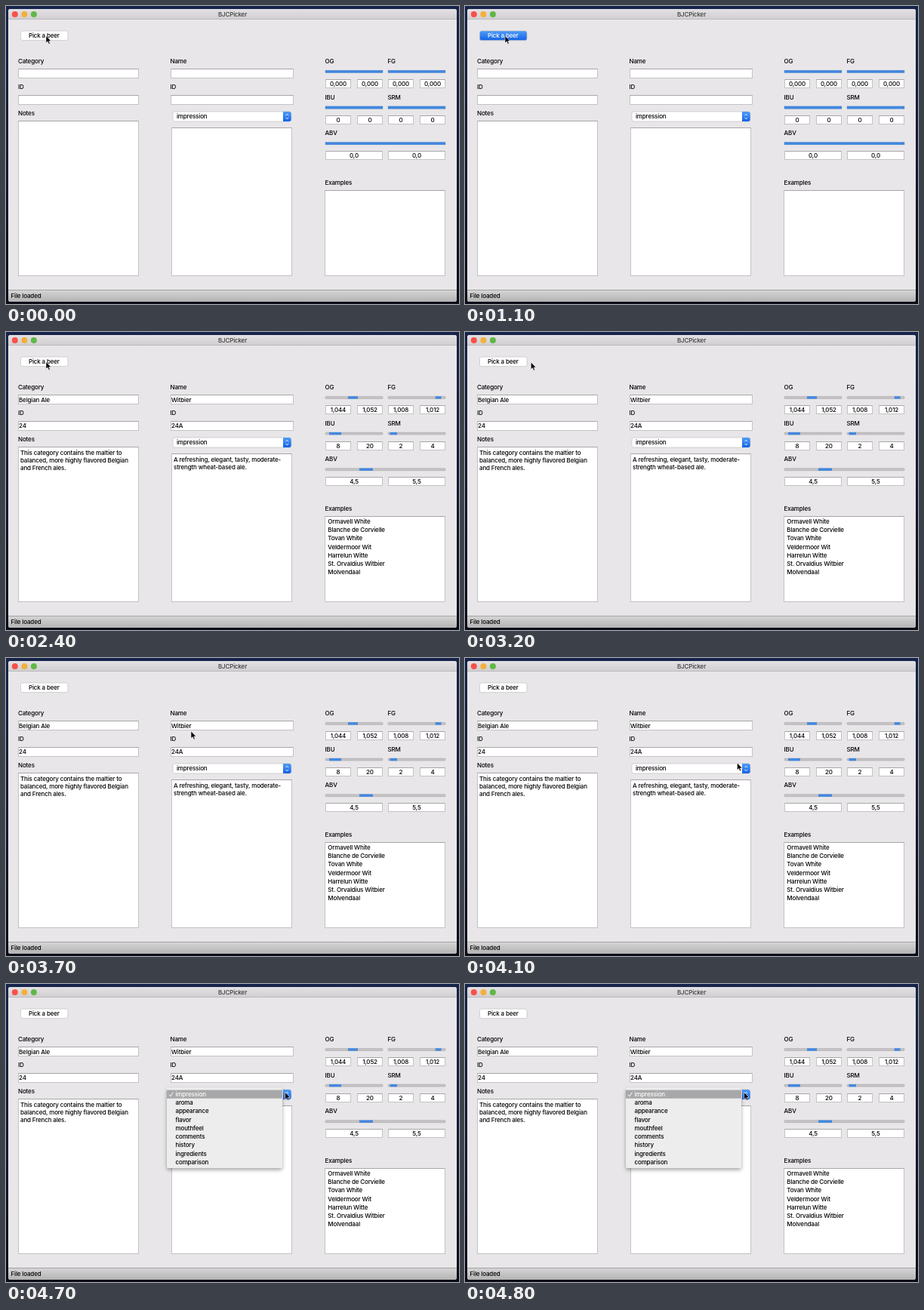
These frames come from a looping animation (600 by 395 pixels, 5 s). An HTML page:

```html
<!DOCTYPE html>
<html lang="en">
<head>
<meta charset="utf-8">
<title>BJCPicker</title>
<style>
html, body { margin: 0; width: 100%; height: 100%; overflow: hidden; background: #10182f; }
svg { display: block; width: 600px; height: 395px; }
text { font: 500 8px Inter, "Open Sans", sans-serif; letter-spacing: -.15px; fill: #000; white-space: pre; }
.mid { text-anchor: middle; }
.light { fill: #fff; }
.title { fill: #3c3c3c; }
</style>
</head>
<body>
<svg id="stage" viewBox="0 0 600 395">
  <defs>
    <linearGradient id="desk" x2="0" y2="1"><stop stop-color="#16244c"/><stop offset=".5" stop-color="#151b33"/><stop offset="1" stop-color="#0a0d18"/></linearGradient>
    <linearGradient id="bar" x2="0" y2="1"><stop stop-color="#e3e1e3"/><stop offset="1" stop-color="#d1cfd1"/></linearGradient>
    <linearGradient id="status" x2="0" y2="1"><stop stop-color="#d8d7d8"/><stop offset="1" stop-color="#b4b3b4"/></linearGradient>
    <linearGradient id="blue" x2="0" y2="1"><stop stop-color="#4f9cf8"/><stop offset="1" stop-color="#1462e6"/></linearGradient>
    <filter id="shadow" x="-10%" y="-10%" width="120%" height="125%"><feDropShadow dx="0" dy="2.5" stdDeviation="2.5" flood-opacity=".35"/></filter>
  </defs>
  <rect width="600" height="395" fill="url(#desk)"/>
  <rect x="3" y="4" width="594" height="388" rx="3" fill="#e8e6e8"/>
  <path d="M3 17V7Q3 4 6 4H594Q597 4 597 7V17Z" fill="url(#bar)"/>
  <path d="M3 17.5H597" stroke="#bdbbbd"/>
  <circle cx="11.8" cy="10.9" r="4" fill="#f9504a"/>
  <circle cx="24.4" cy="10.9" r="4" fill="#f3b03c"/>
  <circle cx="36.9" cy="10.9" r="4" fill="#5fb847"/>
  <path d="M3 376H597V389Q597 392 594 392H6Q3 392 3 389Z" fill="url(#status)"/>
  <path d="M3 376.5H597" stroke="#a5a4a5"/>
  <g id="form"></g>
  <g id="blank"></g>
  <g id="loaded"></g>
  <g id="menu"></g>
  <path id="cursor" d="M0 0V9.6L2.2 7.5 3.7 10.9 5.3 10.2 3.9 7H6.8Z" fill="#000" stroke="#fff" stroke-width=".6"/>
</svg>
<script>
const $ = id => document.getElementById(id);
const text = (x, y, s, cls = '') => `<text x="${x}" y="${y}" class="${cls}">${s}</text>`;
const rect = (x, y, w, h, fill, extra = '') =>
  `<rect x="${x}" y="${y}" width="${w}" height="${h}" fill="${fill}" ${extra}/>`;
const lines = (x, y, step, list) => list.map((s, i) => text(x, y + i * step, s)).join('');
const box = (x, y, w, h) =>
  rect(x, y, w, h, '#fff', 'stroke="#c4c2c4"') +
  `<path d="M${x} ${y}h${w}" stroke="#a9a7a9"/>`;
const button = (fill, cls) =>
  rect(19.5, 33, 62.5, 12.6, fill, 'rx="2.6" stroke="#bcbabc" stroke-width=".6"') +
  text(50.4, 42.2, 'Pick a beer', 'mid ' + cls);

// label, x, y, width, blank value, range values, range start and end
const ranges = [
  ['OG', 423, 76, 76, '0,000', ['1,044', '1,052'], 453, 466],
  ['FG', 506, 76, 76, '0,000', ['1,008', '1,012'], 568.7, 576.5],
  ['IBU', 423, 123.7, 76, '0', ['8', '20'], 428, 444],
  ['SRM', 506, 123.7, 76, '0', ['2', '4'], 508.5, 518],
  ['ABV', 423, 171.3, 159, '0,0', ['4,5', '5,5'], 468, 486],
];

let form = text(300, 13.8, 'BJCPicker', 'mid title') + text(6.5, 386.8, 'File loaded');
for (const [x, y, s] of [
  [16, 76, 'Category'], [16, 110.4, 'ID'], [16, 145, 'Notes'],
  [217.5, 76, 'Name'], [217.5, 110.4, 'ID'], [422.5, 237.4, 'Examples'],
]) form += text(x, y, s);
for (const [x, y, w, h] of [
  [16.5, 83.5, 159, 12], [16.5, 118.5, 159, 12], [16.5, 152.5, 159, 205],
  [218.5, 83.5, 162, 12], [218.5, 118.5, 162, 12], [219.5, 161.5, 159, 196],
  [422.5, 244.5, 159, 113],
]) form += box(x, y, w, h);
form += rect(221, 140, 156.7, 13, '#fff', 'rx="2.6" stroke="#bcbabc" stroke-width=".6"') +
  '<path d="M367 140h8q2.7 0 2.7 2.7v7.6q0 2.7-2.7 2.7h-8z" fill="url(#blue)"/>' +
  '<path d="M370.5 145.3l1.8-2 1.8 2M370.5 147.8l1.8 2 1.8-2" fill="none" stroke="#fff" stroke-width=".9"/>' +
  text(226, 149, 'impression');

let blank = '', loaded = '';
for (const [name, x, y, w, empty, values, from, to] of ranges) {
  const top = y + 9.2;
  form += text(x - .5, y, name);
  blank += rect(x, top, w, 3.4, '#4288df', 'stroke="#3878c8" stroke-width=".3"');
  loaded += rect(x, top + .2, w, 3, '#c5c3c5', 'rx="1" stroke="#a3a1a3" stroke-width=".5"') +
    rect(from, top, to - from, 3.4, '#4288df');
  const bw = w > 100 ? 76 : 34;
  [x, x + w - bw].forEach((bx, i) => {
    form += box(bx + .5, Math.round(y) + 21.5, bw - 1, 11);
    blank += text(bx + bw / 2, y + 30, empty, 'mid');
    loaded += text(bx + bw / 2, y + 30, values[i], 'mid');
  });
}
loaded += text(17, 92.8, 'Belgian Ale') + text(17, 127.2, '24') +
  text(219, 92.8, 'Witbier') + text(219, 127.2, '24A') +
  lines(19, 163, 10.2, ['This category contains the maltier to', 'balanced, more highly flavored Belgian', 'and French ales.']) +
  lines(222, 172, 10.2, ['A refreshing, elegant, tasty, moderate-', 'strength wheat-based ale.']) +
  lines(426.3, 253.8, 11.25, ['Ormavell White', 'Blanche de Corvielle', 'Tovan White', 'Veldermoor Wit',
    'Harrelun Witte', 'St. Orvaldius Witbier', 'Molvendaal']);

$('form').innerHTML = form + `<g id="idle">${button('#fff', '')}</g><g id="pressed">${button('url(#blue)', 'light')}</g>`;
$('blank').innerHTML = blank;
$('loaded').innerHTML = loaded;
$('menu').innerHTML =
  rect(213, 137.5, 153, 106.5, '#ededee', 'rx="3" filter="url(#shadow)"') +
  rect(213, 140.5, 153, 11.2, '#a8a7a9') +
  '<path d="M216 146.6l1.9 2.4 3.4-5.4" fill="none" stroke="#fff" stroke-width="1"/>' +
  text(224.5, 149, 'impression', 'light') +
  lines(224.5, 160.2, 11.25, ['aroma', 'appearance', 'flavor', 'mouthfeel', 'comments', 'history', 'ingredients', 'comparison']);

// time, x, y of the pointer
const path = [
  [0, 53, 39.5], [2900, 53, 39.5], [3000, 58, 39.5], [3200, 87.3, 40], [3500, 165, 67],
  [3800, 285, 112], [4000, 347, 134], [4100, 360.5, 139], [4400, 368, 142.5], [4600, 369.6, 143.4], [5000, 369.6, 143.4],
];
function pointer(t) {
  const i = path.findIndex(p => p[0] > t), [t0, x0, y0] = path[i - 1], [t1, x1, y1] = path[i];
  const k = (t - t0) / (t1 - t0);
  return [x0 + (x1 - x0) * k, y0 + (y1 - y0) * k];
}
const show = (id, on) => $(id).setAttribute('display', on ? 'inline' : 'none');

function draw() {
  const t = Math.floor(performance.now() % 5000 / 100) * 100;
  const pressed = t >= 1000 && t < 1500;
  show('pressed', pressed);
  show('idle', !pressed);
  show('blank', t < 1500);
  show('loaded', t >= 1500);
  show('menu', t >= 4700);
  $('cursor').setAttribute('transform', `translate(${pointer(t)})`);
  requestAnimationFrame(draw);
}
draw();
</script>
</body>
</html>
```
